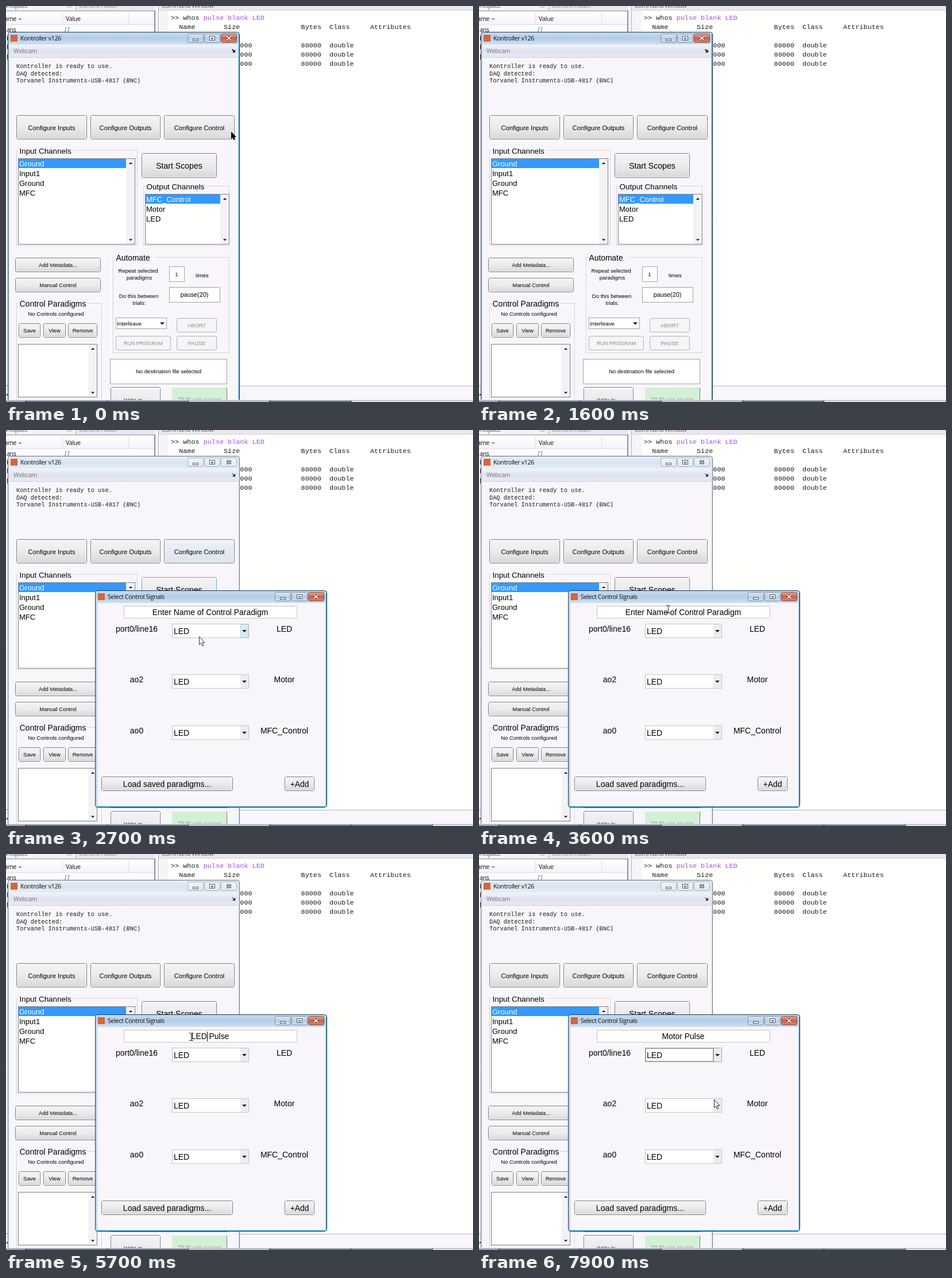
An HTML page with a canvas that plays this animation: 813 by 689 pixels, repeating every 8000 ms.

```html
<!DOCTYPE html>
<html lang="en">
<head>
<meta charset="utf-8">
<title>Control paradigm setup</title>
<style>
html, body { margin: 0; width: 100%; height: 100%; overflow: hidden; background: #fffffc; }
canvas { display: block; width: 813px; height: 689px; }
</style>
</head>
<body>
<canvas id="stage" width="813" height="689"></canvas>
<script>
const ctx = document.getElementById('stage').getContext('2d');
const SANS = '"Liberation Sans", Arial, sans-serif';
const MONO = '"Liberation Mono", "Courier New", monospace';
const UI = '"Open Sans", "Segoe UI", sans-serif';
const FACE = '#f8f6fa', WHITE = '#fffffd', LOOP = 8000, STEP = 100;

// Moments at which the screen changes
const T = {
  toConsole: 300, toWindow: 1400, dialog: 2500, scopesHover: 2800,
  typeName: 3900, renameFrom: 6200, comboFocus: 7400
};

// Pointer path: time, x, y, kind
const PATH = [
  [0, 392, 219, 'dark'], [300, 506, 231, 'beam'], [900, 506, 231, 'arrow'],
  [1300, 428, 563, 'arrow'], [1400, 400, 700, 'arrow'], [1800, 400, 700, 'arrow'],
  [2200, 345, 213, 'arrow'], [2500, 345, 213, 'arrow'], [2700, 336, 359, 'arrow'],
  [3100, 458, 316, 'beam'], [3400, 458, 316, 'beam'], [3800, 199, 308, 'arrow'],
  [5100, 199, 308, 'arrow'], [5600, 318, 318, 'beam'], [6000, 342, 319, 'beam'],
  [6900, 342, 319, 'beam'], [7250, 412, 348, 'arrow'], [7500, 412, 348, 'arrow'],
  [7900, 409, 427, 'arrow'], [8000, 409, 427, 'arrow']
];

function rect(x, y, w, h, c) { ctx.fillStyle = c; ctx.fillRect(x, y, w, h); }

function frame(x, y, w, h, c) {
  ctx.strokeStyle = c;
  ctx.lineWidth = 1;
  ctx.strokeRect(x + .5, y + .5, w - 1, h - 1);
}

function box(x, y, w, h, fill, edge) { rect(x, y, w, h, fill); frame(x, y, w, h, edge); }

function shade(y, h, ...colors) {
  const g = ctx.createLinearGradient(0, y, 0, y + h);
  colors.forEach((c, i) => g.addColorStop(i / (colors.length - 1), c));
  return g;
}

// y is the middle of the capitals; baselines sit on whole pixels
function text(s, x, y, size, color = '#000', align = 'left', font = SANS, style = '') {
  ctx.font = `${style} ${size}px ${font}`;
  ctx.letterSpacing = font === UI ? '-0.4px' : '0px';
  ctx.textAlign = align;
  ctx.fillStyle = color;
  ctx.fillText(s, x, Math.round(y + size * (font === MONO ? .33 : .36)));
}

const mid = (s, x, y, size, color) => text(s, x, y, size, color, 'center');
const ui = (s, x, y, color = '#111', size = 10.8, style = '') => text(s, x, y, size, color, 'left', UI, style);
const mono = (s, x, y, size, color = '#1c1c1c') => text(s, x, y, size, color, 'left', MONO);

function poly(points, fill) {
  ctx.beginPath();
  points.forEach(([x, y]) => ctx.lineTo(x, y));
  ctx.closePath();
  ctx.fillStyle = fill;
  ctx.fill();
}

function tri(x, y, r, up, c = '#111') {
  const d = up ? -r / 2 : r / 2;
  poly([[x - r, y - d], [x + r, y - d], [x, y + d]], c);
}

function rounded(x, y, w, h, fill, edge, r = 3) {
  ctx.beginPath();
  ctx.roundRect(x + .5, y + .5, w - 1, h - 1, r);
  ctx.fillStyle = fill;
  ctx.fill();
  ctx.strokeStyle = edge;
  ctx.lineWidth = 1;
  ctx.stroke();
}

function button(s, x, y, w, h, size, state = '') {
  const off = state === 'off', hot = state === 'hot', warm = state === 'warm';
  const fill = off ? '#f5f4f7'
    : hot ? shade(y, h, '#f0f3f8', '#dbe3ec')
    : shade(y, h, '#f5f4f6', '#ebeaec', '#d7d6da');
  rounded(x, y, w, h, fill, off ? '#b2b4b9' : warm ? '#6ba3c4' : '#7d7d80', 2.5);
  if (!off) {
    ctx.strokeStyle = 'rgba(255,255,255,.7)';
    ctx.strokeRect(x + 1.5, y + 1.5, w - 3, h - 3);
  }
  mid(s, x + w / 2, y + h / 2 + .5, size, off ? '#8b8b8e' : '#000');
}

function group(s, x, y, w, h, gap, size) {
  frame(x + 1, y + 1, w, h, '#ffffff');
  frame(x, y, w, h, '#cfced4');
  rect(x + 3, y - 2, gap, 5, FACE);
  text(s, x + 5.5, y + 1, size);
}

function list(items, x, y, w, h) {
  box(x, y, w, h, WHITE, '#7d7f85');
  const sx = x + w - 16;
  rect(sx, y + 1, 15, h - 2, '#f3f2f6');
  tri(sx + 8, y + 8.5, 3.2, true);
  tri(sx + 8, y + h - 8, 3.2, false);
  items.forEach((s, i) => {
    if (!i) rect(x + 1, y + 1, w - 17, 16, '#3399ff');
    text(s, x + 2, y + 9.5 + i * 16.8, 13, i ? '#000' : '#fff');
  });
}

function caption(title, x, y, w, active) {
  rect(x + 4, y + 5, 12, 12, '#d8643c');
  ui(title, x + 21, y + 11.5);
  const bx = x + w - 90, by = y + 3;
  for (let i = 0; i < 3; i++) {
    const px = bx + i * 29, red = i === 2 && active;
    const fill = red ? shade(by, 16, '#e6b3a6', '#cc5f4a', '#d88a72')
      : active ? shade(by, 16, '#dfeaf6', '#b9cfe6', '#cfdff0')
      : shade(by, 16, '#f0f4fa', '#e2e9f2');
    rounded(px, by, 28, 16, fill, red ? '#7d4740' : active ? '#7d8fa5' : '#a3adba', 2);
    const cx = px + 14, cy = by + 8, ink = red ? '#fff' : '#4d5561';
    if (i === 0) box(cx - 5, cy + 1, 10, 4, '#fff', ink);
    if (i === 1) {
      box(cx - 5, cy - 4, 10, 8, '#fff', ink);
      frame(cx - 2, cy - 1, 4, 3, ink);
    }
    if (i === 2) {
      for (const [c, lw] of red ? [['#70251c', 4], ['#fff', 2]] : [[ink, 3], ['#fff', 1]]) {
        ctx.strokeStyle = c;
        ctx.lineWidth = lw;
        ctx.beginPath();
        ctx.moveTo(cx - 3.5, cy - 3); ctx.lineTo(cx + 3.5, cy + 3);
        ctx.moveTo(cx + 3.5, cy - 3); ctx.lineTo(cx - 3.5, cy + 3);
        ctx.stroke();
      }
    }
  }
}

function shell(x, y, w, h, active) {
  rounded(x, y, w, h, active ? '#bdd5ec' : '#dfe8f3', active ? '#1f3d54' : '#67717c', 4);
  rect(x + 2, y + 2, w - 4, 20, active
    ? shade(y, 22, '#c9dcef', '#b5cde7', '#cfe0f1')
    : shade(y, 22, '#e6edf6', '#dbe5f1', '#e6edf5'));
  if (active) {
    rect(x + w - 2, y + 4, 1, h - 6, '#2f9fd0');
    rect(x + 2, y + h - 2, w - 4, 1, '#2f9fd0');
  }
}

function workspace(active) {
  rect(0, 0, 813, 689, '#f4f2f8');
  // Variable list
  rect(0, 0, 260, 9, '#e9e8ee');
  rect(0, 0, 120, 8, '#f3f2f7');
  rect(121, 0, 1, 8, '#b8b8c0');
  text('Workspace', 38, -1, 10.8, '#555', 'right', UI);
  ctx.strokeStyle = '#999';
  ctx.lineWidth = 1;
  ctx.beginPath();
  ctx.arc(110, -2, 4.5, 0, 7);
  ctx.stroke();
  ui('Current Folder', 127, -1, '#888');
  rect(0, 9, 259, 652, '#fdfbff');
  rect(0, 9, 259, 23, shade(9, 23, '#ffffff', '#f4f3f8'));
  rect(0, 8, 260, 1, '#85858b');
  rect(0, 32, 259, 1, '#dddce3');
  rect(98, 10, 1, 22, '#dddce3');
  rect(213, 10, 1, 22, '#dddce3');
  rect(258, 9, 2, 653, '#909096');
  rect(0, 660, 260, 1, '#909096');
  text('Name', 18, 22, 10.8, '#111', 'right', UI);
  tri(24.5, 22, 4, true, '#a5a5aa');
  ui('Value', 104, 22);
  ['ans', 'blank', 'LED', 'pulse'].forEach((s, i) => {
    const y = 41 + i * 15;
    ui(s, 1, y);
    ui(i ? '1x10000 double' : '[ ]', 102, y, '#2a6e9e', 10.5, 'italic');
  });

  // Console
  const edge = active ? '#173f70' : '#aeb0b8';
  rect(265, 0, 548, 663, WHITE);
  rect(267, 8, 16, 653, '#f6f4f9');
  rect(265, 0, 548, 8, active ? '#173f70' : '#e9e8ee');
  if (!active) rect(265, 7, 548, 1, '#d4d3da');
  rect(265, 0, active ? 2 : 1, 663, edge);
  rect(265, 661, 548, active ? 2 : 1, edge);
  ui('Command Window', 271, -1, active ? '#fff' : '#555');
  const put = (s, col, y, c) => mono(s, 287 + col * 7.08, y, 11.8, c);
  put('>> whos', 0, 20);
  put('pulse blank LED', 8, 20, '#a94be8');
  [['Name', 2], ['Size', 13], ['Bytes', 32], ['Class', 39], ['Attributes', 49]]
    .forEach(([s, n]) => put(s, n, 36));
  ['LED', 'blank', 'pulse'].forEach((s, i) => {
    const y = 68 + i * 16;
    put(s, 2, y);
    put('1x10000', 13, y);
    put('80000', 32, y);
    put('double', 39, y);
  });
  text('fx', 270, 131, 13, '#111', 'left', '"Liberation Serif", serif', 'italic bold');
  tri(279, 136, 2, false);
  put('>>', 0, 131.5);
  if (active) rect(308, 123, 1, 16, '#111');

  // Status strip
  rect(0, 663, 813, 23, '#f8f6fb');
  tri(2.5, 676, 2.5, true);
  rect(9, 666, 1, 18, '#9a9aa0');
}

function taskbar(end) {
  rect(0, 685, 813, 4, '#dfe5ee');
  rect(0, 686, 813, 1, '#aab4c2');
  rect(0, 687, 34, 2, '#8fa4ba');
  rect(34, 687, end - 34, 2, '#64758a');
  for (let x = 34; x < end; x += 141.5) rect(Math.round(x), 686, 1, 3, '#2f3b49');
  rect(318, 687, 140, 2, '#b9c5d3');
  rect(end, 686, 1, 3, '#2f3b49');
}

function kontroller(active, controlHot, scopesHot) {
  ctx.save();
  ctx.beginPath();
  ctx.rect(0, 0, 813, 686);
  ctx.clip();
  shell(3, 45, 404, 660, active);
  caption('Kontroller v126', 4, 45, 402, active);
  rect(6, 67, 398, 640, FACE);
  rect(6, 67, 398, 22, shade(67, 22, '#f3f4fa', '#dfe3f0', '#e8ebf5'));
  rect(6, 89, 398, 1, '#c9ccd8');
  ui('Webcam', 13, 78, '#777', 10.8);
  ctx.strokeStyle = '#111';
  ctx.beginPath();
  ctx.moveTo(393.5, 75.5);
  ctx.lineTo(398, 79);
  ctx.stroke();
  poly([[399, 76], [399, 81], [394, 81]], '#111');

  ['Kontroller is ready to use.', 'DAQ detected:', 'Torvanel Instruments-USB-4817 (BNC)']
    .forEach((s, i) => mono(s, 18, 105 + i * 12.3, 10.3));
  button('Configure Inputs', 18, 190, 123, 42, 11.2);
  button('Configure Outputs', 147, 190, 122, 42, 11.2);
  button('Configure Control', 275, 190, 123, 42, 11.2, controlHot ? 'hot' : '');

  group('Input Channels', 18, 251, 211, 166, 96, 13.4);
  list(['Ground', 'Input1', 'Ground', 'MFC'], 21, 265, 204, 150);
  button('Start Scopes', 236, 256, 131, 43, 14.1, scopesHot ? 'warm' : '');
  group('Output Channels', 239, 313, 150, 104, 108, 13.45);
  list(['MFC_Control', 'Motor', 'LED'], 242, 327, 147, 88);

  button('Add Metadata...', 16, 438, 149, 25, 9.5);
  button('Manual Control', 16, 473, 149, 25, 9.5);

  group('Control Paradigms', 18, 517, 149, 190, 120, 14);
  mid('No Controls configured', 87, 535.5, 9.55);
  button('Save', 22, 552, 38, 25, 9.6);
  button('View', 65, 552, 39, 25, 9.6);
  button('Remove', 108, 552, 51, 25, 9.6);
  list([], 21, 588, 138, 93);

  group('Automate', 186, 437, 203, 167, 70, 13.8);
  mid('Repeat selected', 230, 460.5, 9.55);
  mid('paradigms', 232, 472.5, 9.55);
  box(284, 453, 27, 27, WHITE, '#a2a2a8');
  mid('1', 297, 467, 9.55);
  text('times', 330, 469, 9.55);
  mid('Do this between', 231, 504.5, 9.55);
  mid('trials:', 232, 516.5, 9.55);
  box(284, 489, 89, 27, WHITE, '#a2a2a8');
  mid('pause(20)', 328, 502.5, 10.8);
  box(191, 542, 89, 20, WHITE, '#a5a5ab');
  text('Interleave', 193, 552.5, 9.8);
  tri(272, 552.5, 4, false);
  button('ABORT', 297, 543, 70, 25, 9.3, 'off');
  button('RUN PROGRAM', 191, 574, 96, 25, 8.95, 'off');
  button('PAUSE', 297, 574, 70, 25, 9.3, 'off');

  box(181, 614, 204, 44, WHITE, '#a2a2a8');
  mid('No destination file selected', 283, 636, 9.55);
  button('Write to...', 182, 663, 87, 44, 9.6);
  rect(289, 664, 96, 30, '#d3f0d6');
  rect(384, 664, 1, 30, '#6f7a70');
  mid('RUN w/o saving', 337, 685, 10.3, '#8a998c');
  ctx.restore();
}

function combo(y, hot, focus) {
  box(289, y, 134, 25, WHITE, focus ? '#a2a2a8' : '#c4c4ca');
  rect(408, y + 1, 14, 23, hot ? '#dcebf7' : '#edecf0');
  if (hot) frame(408, y + 1, 14, 23, '#b3d3e8');
  text('LED', 292, y + 13, 14);
  tri(415, y + 13, 3.8, false);
  if (focus) {
    rect(408, y + 1, 1, 23, '#a2a2a8');
    ctx.setLineDash([1, 1]);
    frame(290, y + 1, 118, 23, '#444');
    ctx.setLineDash([]);
  }
}

// Contents of the name field, and how many letters precede the caret
function nameField(t) {
  if (t < T.typeName) return ['Enter Name of Control Paradigm', -1];
  if (t < T.renameFrom) {
    const n = Math.min(9, 1 + Math.floor((t - T.typeName) / 100));
    return ['LED Pulse'.slice(0, n), t < 5600 ? n : 3];
  }
  const n = Math.min(5, 1 + Math.floor((t - T.renameFrom) / 100));
  return ['Motor'.slice(0, n) + ' Pulse', t < T.comboFocus ? n : -1];
}

function dialog(t) {
  shell(155, 279, 404, 378, true);
  caption('Select Control Signals', 156, 279, 402, true);
  rect(159, 301, 397, 353, FACE);
  box(205, 306, 302, 22, WHITE, '#c4c4ca');
  const [name, caret] = nameField(t);
  mid(name, 355.5, 317, 13.9);
  if (caret >= 0) {
    const left = 355.5 - ctx.measureText(name).width / 2;
    rect(Math.round(left + ctx.measureText(name.slice(0, caret)).width), 309, 1, 17, '#000');
  }
  const [px, py] = pointer(t);
  [['port0/line16', 'LED'], ['ao2', 'Motor'], ['ao0', 'MFC_Control']].forEach(([a, b], i) => {
    const y = Math.round(336.5 + i * 88.5);
    const over = px > 289 && px < 423 && py >= y && py < y + 25;
    mid(a, 227.5, y + 8.5, 14);
    mid(b, 484.5, y + 8.5, 14);
    combo(y, over && t < T.comboFocus, i === 0 && t >= T.comboFocus);
  });
  button('Load saved paradigms...', 166, 603, 229, 25, 14);
  button('+Add', 485, 603, 52, 25, 13.8);
}

function pointer(t) {
  let i = 0;
  while (i < PATH.length - 2 && t >= PATH[i + 1][0]) i++;
  const [t0, x0, y0, kind] = PATH[i], [t1, x1, y1] = PATH[i + 1];
  const u = (t - t0) / (t1 - t0), e = u * u * (3 - 2 * u);
  return [x0 + (x1 - x0) * e, y0 + (y1 - y0) * e, kind];
}

function drawPointer(t) {
  const [px, py, kind] = pointer(t);
  const x = Math.round(px), y = Math.round(py);
  if (kind === 'beam') {
    rect(x, y - 6, 1, 13, '#222');
    for (const s of [-7, 6]) {
      rect(x - 3, y + s, 3, 1, '#222');
      rect(x + 1, y + s, 3, 1, '#222');
    }
    return;
  }
  const dark = kind === 'dark', k = dark ? .8 : 1;
  const shape = [[0, 0], [0, 14], [3, 11], [5.5, 16.5], [7.5, 15.5], [5.2, 10.3], [9.5, 10.3]];
  poly(shape.map(([a, b]) => [x + .5 + a * k, y + .5 + b * k]), dark ? '#000' : '#fff');
  ctx.strokeStyle = dark ? '#000' : '#333';
  ctx.lineWidth = 1;
  ctx.stroke();
}

function draw(t) {
  const inConsole = t >= T.toConsole && t < T.toWindow;
  const open = t >= T.dialog;
  workspace(inConsole);
  if (!inConsole) {
    const hot = t >= 2200 && t < T.scopesHover;
    kontroller(!open, hot, open && t < T.scopesHover);
  }
  taskbar(open ? 742 : 600);
  if (open) dialog(t);
  drawPointer(t);
}

function tick(now) {
  draw(Math.floor(now % LOOP / STEP) * STEP);
  requestAnimationFrame(tick);
}

draw(0);
requestAnimationFrame(tick);
</script>
</body>
</html>
```
